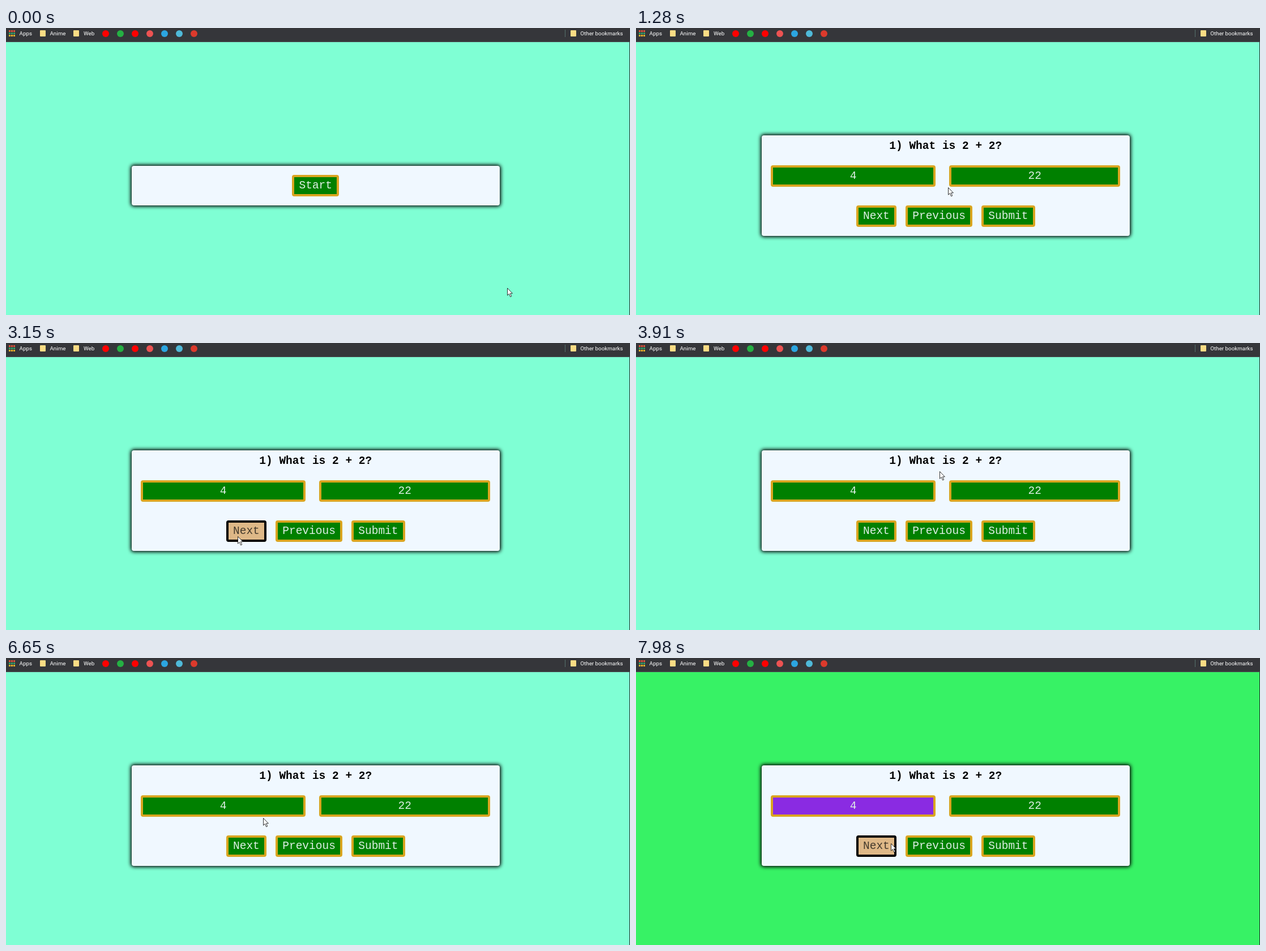
Animation, 1102 px wide and 508 px high, one loop 8 s. Source, as an HTML page:

```html
<!DOCTYPE html>
<html lang="en">
<head>
<meta charset="utf-8">
<title>Quiz</title>
<style>
html, body { margin: 0; width: 100%; height: 100%; overflow: hidden; }
[hidden] { display: none !important; }
#stage { position: relative; width: 1102px; height: 508px; overflow: hidden; background: #7fffd4; }
#stage.right { background: #37f265; }
#edge { position: absolute; right: 0; top: 25px; width: 1px; height: 100%; background: #1c2b27; }

#bar { position: absolute; z-index: 1; box-sizing: border-box; width: 100%; height: 25px; padding: 0 12.5px 5px 5px;
  display: flex; align-items: center; gap: 14px; background: #35363a; border-bottom: 1px solid #4a4c50;
  font: 9.8px/19px Roboto, sans-serif; color: #fff; white-space: pre; }
#bar span { display: flex; align-items: center; gap: 7.5px; }
#bar .last { margin-left: auto; padding-left: 9.5px; background: linear-gradient(#56706c, #56706c) 0 3px / 1px 13px no-repeat; }
.folder { width: 10px; height: 11px; border-radius: 1px; background: #fbdc84; }
.dot { width: 12px; height: 12px; border-radius: 50%; }
.grid { display: grid; grid-template-columns: repeat(3, 3px); gap: 1px; }
.grid i { height: 3px; }

#main { position: absolute; left: 222px; width: 649.5px; height: 557.5px; display: flex; align-items: center; }
.card { box-sizing: border-box; width: 100%; padding: 0 16.25px 16.25px; border-radius: 4px;
  background: #f0f8ff; box-shadow: 0 0 6px 2px #000; font: 19.5px/31px "Liberation Mono", monospace; }
.title { height: 37.5px; text-align: center; font-weight: bold; line-height: 38.5px; color: #000; }
.row { display: flex; justify-content: center; gap: 16.25px; padding-top: 16.25px; }
.answers { gap: 24.4px; padding-bottom: 16.25px; }
.answers .btn { flex: 1 1 auto; }
.btn { box-sizing: border-box; height: 38px; padding: 0 8.1px; border: 4px solid #daa520; border-radius: 4px;
  background: #008000; color: #dfeee6; text-align: center; }
.btn.picked { background: #8a2be2; }
.btn.hover { background: #deb887; border-color: #000; color: #443a2c; }
#cursor { position: absolute; left: 0; top: 0; overflow: visible; }
</style>
</head>
<body>
<div id="stage">
  <div id="edge"></div>
  <div id="bar">
    <span><b class="grid"></b>Apps</span>
    <span><i class="folder"></i>Anime</span>
    <span><i class="folder"></i>Web</span>
    <span class="last"><i class="folder"></i>Other bookmarks</span>
  </div>
  <div id="main">
    <div class="card" id="intro">
      <div class="row"><div class="btn">Start</div></div>
    </div>
    <div class="card" id="quiz">
      <div class="title">1) What is 2 + 2?</div>
      <div class="row answers"><div class="btn" id="four">4</div><div class="btn">22</div></div>
      <div class="row"><div class="btn">Next</div><div class="btn">Previous</div><div class="btn">Submit</div></div>
    </div>
  </div>
  <svg id="cursor" width="12" height="18">
    <path d="M.5 .5V13.2L3.4 10.5L5.6 15.8L7.7 14.9L5.5 9.8H9.4Z" fill="#fff" stroke="#000" stroke-width=".8"/>
  </svg>
</div>
<script>
const LOOP = 8000, STEP = 70, OPEN = 1210, ANSWER = 7120;
const $ = id => document.getElementById(id);
const buttons = [...document.querySelectorAll('.btn')];

function swatch(color, cls = '') {
  const el = document.createElement('i');
  el.className = cls;
  el.style.background = color;
  return el;
}
for (const color of ['#e5533d', '#35a56b', '#f0b429'])
  for (let i = 0; i < 3; i++) document.querySelector('.grid').append(swatch(color));
for (const color of ['#f00', '#25b043', '#f00', '#ec5252', '#2ca5e0', '#4fb9d8', '#dc3a2c'])
  document.querySelector('.last').before(swatch(color, 'dot'));

// Pointer stops: begin time, x, y, number of steps (3 unless given)
const stops = [
  [0, 885, 460, 1], [70, 756, 381, 5], [670, 551, 282, 7],
  [1600, 520, 265], [1980, 575, 270], [2380, 500, 264],
  [2750, 408, 354], [3150, 410, 330, 2], [3460, 626, 283],
  [3770, 536, 227], [4010, 481, 283, 5], [4470, 430, 335],
  [4930, 525, 272], [5340, 447, 302], [5630, 430, 342],
  [6650, 454, 283, 1], [6720, 451, 262], [7750, 450, 328, 4]
];

function pointer(t) {
  const i = stops.findLastIndex(([begin]) => begin <= t);
  const [begin, x, y, steps = 3] = stops[i];
  const [, fromX, fromY] = stops[Math.max(0, i - 1)];
  const u = Math.min(1, (Math.floor((t - begin) / STEP) + 1) / steps);
  return [Math.round(fromX + (x - fromX) * u), Math.round(fromY + (y - fromY) * u)];
}

function covers(el, x, y) {
  const box = el.getBoundingClientRect();
  return x >= box.left && x <= box.right && y >= box.top && y <= box.bottom + 1;
}

function draw() {
  const t = performance.now() % LOOP;
  const [x, y] = pointer(t);
  $('intro').hidden = t >= OPEN;
  $('quiz').hidden = t < OPEN;
  $('four').classList.toggle('picked', t >= ANSWER);
  $('stage').classList.toggle('right', t >= ANSWER);
  for (const b of buttons) b.classList.toggle('hover', covers(b, x, y));
  $('cursor').style.transform = `translate(${x}px, ${y}px)`;
  requestAnimationFrame(draw);
}
draw();
</script>
</body>
</html>
```
